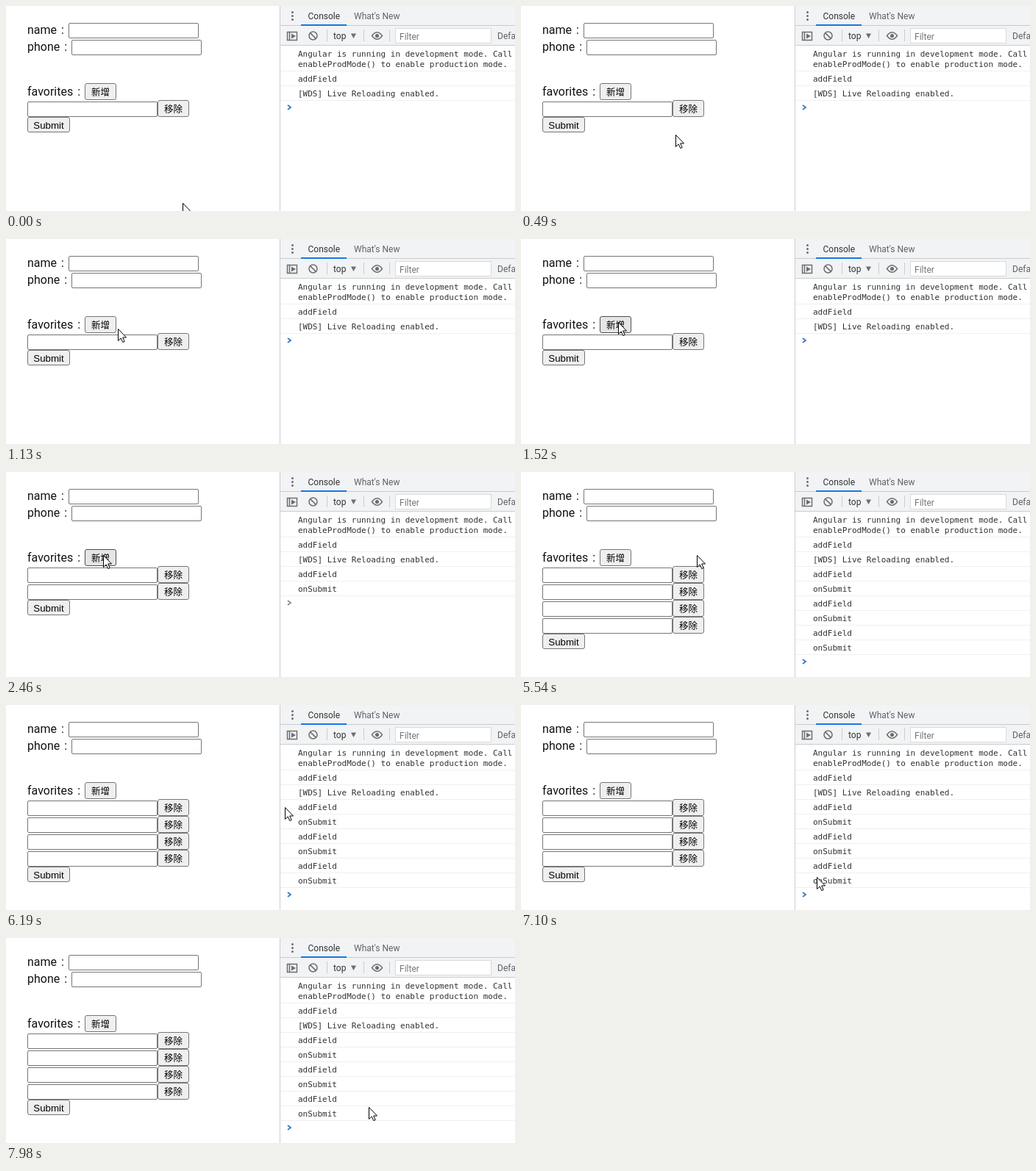
Recreate the animation shown at these times as an HTML page. Size 692 by 279 pixels, loop 8 s.

```html
<!DOCTYPE html>
<html lang="zh-TW">
<head>
<meta charset="utf-8">
<title>Form and console</title>
<style>
  html, body { margin: 0; width: 100%; height: 100%; overflow: hidden; background: #fff; }
  svg { display: block; }
  .label { font: 16px Roboto, sans-serif; fill: #111; }
  .button { font: 13.333px 'Liberation Sans', sans-serif; text-anchor: middle; }
  .button:lang(zh) { font: 300 12.5px 'Noto Sans CJK TC', sans-serif; }
  .ui { font: 12px Roboto, sans-serif; fill: #5f6368; }
  .ui .strong { fill: #333; }
  .ui .hint { fill: #757575; }
  .log { font: 11px 'DejaVu Sans Mono', monospace; fill: #303030; }
  .icon { fill: none; stroke: #6e6e6e; stroke-width: 1.5; }
</style>
</head>
<body>
<svg width="692" height="279" viewBox="0 0 692 279">
  <g id="form"></g>
  <g id="devtools">
    <path fill="#f1f3f4" d="M373 0H692V54H373Z"/>
    <path fill="none" stroke="#cacdd1" d="M372.5 0V279M373 26.5H692M373 53.5H692M436.5 32V48M486.5 32V48M521.5 32V48"/>
    <path fill="#1a73e8" d="M401 25H463V27H401Z"/>
    <path fill="none" stroke="#6e6e6e" stroke-width="3" stroke-linecap="round" stroke-dasharray="0 5" d="M389.5 8.5V19"/>
    <path fill="#6e6e6e" d="M388 37.5L394 41L388 44.5ZM469 37.5H476L472.5 44Z"/>
    <g class="icon">
      <path d="M382.5 35.5H395.5V46.5H382.5ZM385.5 35.5V46.5"/>
      <circle cx="417.5" cy="40.5" r="5.5"/>
      <path d="M413.6 36.6L421.4 44.4"/>
      <path d="M497.5 40.5Q504.5 31 511.5 40.5Q504.5 50 497.5 40.5Z"/>
      <circle cx="504.5" cy="40.5" r="1.8" fill="#6e6e6e"/>
    </g>
    <rect x="529.5" y="30.5" width="130" height="20" fill="#fff" stroke="#d8dade"/>
    <g class="ui">
      <text class="strong" x="410.5" y="18">Console</text>
      <text x="473" y="18">What's New</text>
      <text class="strong" x="445" y="45">top</text>
      <text class="hint" x="535" y="46">Filter</text>
      <text x="668" y="45">Default levels</text>
    </g>
  </g>
  <g id="console"></g>
  <g id="cursor">
    <path id="arrow" fill="#fff" stroke="#000" d="M.5 .5V16.5L4.2 13L6.8 18.6L9.2 17.5L6.7 12H11.5Z"/>
    <path id="beam" fill="none" stroke="#000" d="M-3 -8.5H-1L.5 -7.5L2 -8.5H4M.5 -7.5V7.5M-3 8.5H-1L.5 7.5L2 8.5H4"/>
  </g>
</svg>
<script>
const DURATION = 8000;
const ROW = 23;
const clicks = [
  { press: 2250, release: 2400 },
  { press: 3070, release: 3250 },
  { press: 3940, release: 4050 }
];

// Pointer strokes: each starts where the last one ended and may bend towards a point.
const origin = [240, 268];
const strokes = [
  { begin: 0, end: 820, to: [167, 133], bend: [232, 176] },
  { begin: 920, end: 1300, to: [140, 113] },
  { begin: 1460, end: 1520, to: [132, 113] },
  { begin: 5440, end: 5660, to: [365, 113] },
  { begin: 5840, end: 6600, to: [378, 175], bend: [388, 139] },
  { begin: 6700, end: 7500, to: [457, 266], bend: [386, 247] },
  { begin: 7600, end: 7980, to: [493, 230] }
];

const byId = id => document.getElementById(id);
const mix = (a, b, k) => a.map((v, i) => v + (b[i] - v) * k);

function pointerAt(t) {
  let at = origin;
  for (const { begin, end, to, bend } of strokes) {
    if (t < begin) break;
    const k = Math.min(1, (t - begin) / (end - begin));
    at = bend ? mix(mix(at, bend, k), mix(bend, to, k), k) : mix(at, to, k);
  }
  return at.map(Math.round);
}

const inside = ([px, py], x, y, w, h) => px >= x && px < x + w && py >= y && py < y + h;

function box(x, y, w, h, radius, fill, stroke) {
  return `<rect x="${x + .5}" y="${y + .5}" width="${w - 1}" height="${h - 1}" rx="${radius}" fill="${fill}" stroke="${stroke}"/>`;
}

function input(x, y, pointer) {
  const hover = inside(pointer, x, y, 177, 21);
  return box(x, y, 177, 21, 1.5, '#fff', hover ? '#4f4f4f' : '#767676');
}

function button(text, lang, x, y, w, h, pointer, pressed) {
  const hover = inside(pointer, x, y, w, h);
  const [fill, stroke] = hover && pressed ? ['#f5f5f5', '#8d8d8d']
    : hover ? ['#e5e5e5', '#4f4f4f'] : ['#efefef', '#767676'];
  return box(x, y, w, h, 2.5, fill, stroke) +
    `<text class="button" lang="${lang}" x="${x + w / 2}" y="${y + h / 2 + 5}">${text}</text>`;
}

const label = (text, y) =>
  `<text class="label" x="29" y="${y}">${text}<tspan dx="6">:</tspan></text>`;

function drawForm(rows, pointer, pressed) {
  let out = label('name', 38) + input(85, 23, pointer) +
    label('phone', 61) + input(89, 46, pointer) +
    label('favorites', 122) + button('新增', 'zh', 107, 105, 43, 23, pointer, pressed);
  for (let i = 0; i < rows; i++) {
    const y = 128 + i * ROW;
    out += input(29, y + 2, pointer) + button('移除', 'zh', 206, y, 43, 23, pointer);
  }
  return out + button('Submit', 'en', 29, 128 + rows * ROW, 58, 21, pointer);
}

function drawConsole(added) {
  const logs = ['addField', '[WDS] Live Reloading enabled.'];
  for (let i = 0; i < added; i++) logs.push('addField', 'onSubmit');
  const line = (text, y) => `<text class="log" x="397" y="${y}">${text}</text>`;
  const rule = y => `<path stroke="#f0f0f0" d="M373 ${y + .5}H692"/>`;
  let out = line('Angular is running in development mode. Call', 69) +
    line('enableProdMode() to enable production mode.', 83) + rule(88);
  logs.forEach((text, i) => out += line(text, 103 + i * 20) + rule(108 + i * 20));
  const y = 98 + logs.length * 20;
  const color = added === 1 ? '#8a8f96' : '#367cc0';
  return out + `<path fill="none" stroke="${color}" stroke-width="1.8" d="M383 ${y - 3}l4 3l-4 3"/>`;
}

function setContent(id, markup) {
  const node = byId(id);
  if (node.markup !== markup) node.innerHTML = node.markup = markup;
}

function draw(t) {
  const pointer = pointerAt(t);
  const added = clicks.filter(({ release }) => t >= release).length;
  const pressed = clicks.some(({ press, release }) => t >= press && t < release);
  const overInput = inside(pointer, 29, 130, 177, 21);
  setContent('form', drawForm(1 + added, pointer, pressed));
  setContent('console', drawConsole(added));
  byId('cursor').setAttribute('transform', `translate(${pointer})`);
  byId('arrow').style.display = overInput ? 'none' : '';
  byId('beam').style.display = overInput ? '' : 'none';
}

const start = performance.now();
function frame() {
  draw((performance.now() - start) % DURATION);
  requestAnimationFrame(frame);
}
frame();
</script>
</body>
</html>
```
